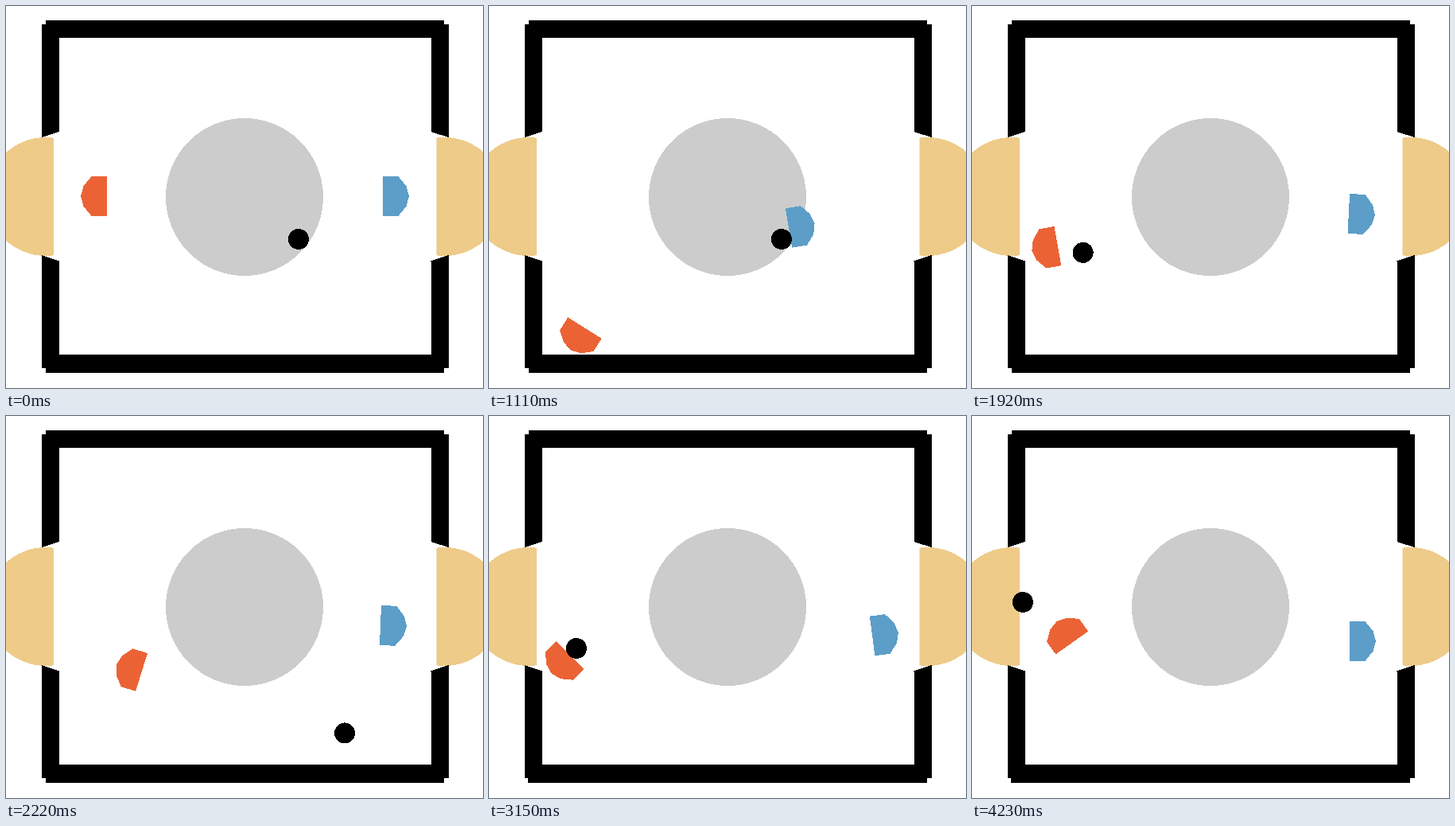
Write an HTML page that moves like this. It is 600 px wide and 480 px high and loops after 4.26 s.

```html
<!DOCTYPE html>
<html lang="en">
<head>
<meta charset="utf-8">
<title>Table football duel</title>
<style>
  html, body { margin: 0; width: 100%; height: 100%; overflow: hidden; background: #fff; }
  svg { display: block; width: 600px; height: 480px; shape-rendering: crispEdges; }
</style>
</head>
<body>
<svg viewBox="0 0 600 480">
  <defs>
    <!-- flat side at x = 15, facing right -->
    <path id="paddle" d="M15-25V25H-4.3L-14.5 12.7L-18 0L-14.5-12.7L-4.3-25Z"/>
    <clipPath id="goalLine"><path d="M-40 150H60V330H-40Z"/></clipPath>
    <g id="side">
      <circle cx="50" cy="239.5" r="74.5" fill="#eecb89" clip-path="url(#goalLine)"/>
      <path d="M45 23H67V158L45 165Z"/>
      <path d="M45 313L67 320.5V455H45Z"/>
    </g>
  </defs>
  <circle cx="300" cy="240" r="99" fill="#ccc"/>
  <use href="#side"/>
  <use href="#side" transform="translate(601.5 0) scale(-1 1)"/>
  <rect x="50" y="18" width="501" height="22"/>
  <rect x="50" y="438" width="501" height="23"/>
  <rect id="dent" x="49" y="438" width="10" height="23"/>
  <use id="red" href="#paddle" fill="#eb6335"/>
  <use id="blue" href="#paddle" fill="#5c9ec8"/>
  <circle id="ball" r="13"/>
</svg>
<script>
const LOOP = 4260, STEP = 30, FLOOR_HIT = 2310;

// Turning points and contacts: time, x, y, angle
const redKeys = [
  [0, 112, 239, 0], [840, 114, 420, -52], [1110, 112.5, 417.2, -58],
  [1590, 101, 313, -62], [1780, 76, 302, -30], [2220, 156.2, 317.5, 17.3],
  [2600, 172, 352, 0], [3150, 91.5, 311, -45], [3520, 150, 369, 33],
  [3690, 165.2, 346.3, 50], [4230, 117, 272.8, 54.7]
];
const blueKeys = [
  [0, 489, 239, 0], [540, 514, 258, -1], [1110, 391.8, 276.5, -9.5],
  [1590, 436, 275.3, 1.5], [2010, 494, 260, 3], [2220, 486, 263.6, 2.3],
  [2700, 515, 274, -2], [3150, 497, 274.5, -7.5], [3400, 439, 282, -1],
  [3690, 447.5, 291.5, 8], [4230, 490, 283, 0]
];
// The ball runs straight from contact to contact: time, x, y
const ballKeys = [
  [0, 368, 293], [1110, 368, 293], [1590, 132, 306], [1890, 111, 301],
  [FLOOR_HIT, 512, 425], [3150, 110, 292], [3270, 118, 290],
  [3690, 420, 289], [4230, 64, 234]
];

function segment(keys, t) {
  let i = 0;
  while (i < keys.length - 2 && t >= keys[i + 1][0]) i++;
  return i;
}

function linear(keys, t) {
  const i = segment(keys, t), a = keys[i], b = keys[i + 1];
  const u = (t - a[0]) / (b[0] - a[0]);
  return [1, 2].map(k => a[k] + (b[k] - a[k]) * u);
}

function slope(keys, i, k) {
  if (i === 0) return 0;
  const rate = j => (keys[j + 1][k] - keys[j][k]) / (keys[j + 1][0] - keys[j][0]);
  if (i === keys.length - 1) return rate(i - 1);
  const before = rate(i - 1), after = rate(i);
  // Turning points stay flat so the curve never overshoots a key
  return before * after <= 0 ? 0 : 2 * before * after / (before + after);
}

function smooth(keys, t) {
  const i = segment(keys, t), a = keys[i], b = keys[i + 1];
  const span = b[0] - a[0], u = (t - a[0]) / span, v = 1 - u;
  return [1, 2, 3].map(k =>
    v * v * (1 + 2 * u) * a[k] + u * u * (3 - 2 * u) * b[k] +
    span * u * v * (v * slope(keys, i, k) - u * slope(keys, i + 1, k)));
}

const part = id => document.getElementById(id);
const red = part("red"), blue = part("blue"), ball = part("ball"), dent = part("dent");

function place(el, [x, y, angle = 0]) {
  el.setAttribute("transform", `translate(${x} ${y}) rotate(${angle})`);
}

function draw(t) {
  place(red, smooth(redKeys, t));
  const [x, y, tilt] = smooth(blueKeys, t);
  place(blue, [x, y, tilt + 180]);
  place(ball, linear(ballKeys, t));
  dent.style.visibility = t > FLOOR_HIT ? "visible" : "hidden";
}

const start = performance.now();
function tick() {
  const t = (performance.now() - start) % LOOP;
  draw(Math.floor(t / STEP) * STEP);
  requestAnimationFrame(tick);
}
tick();
</script>
</body>
</html>
```
